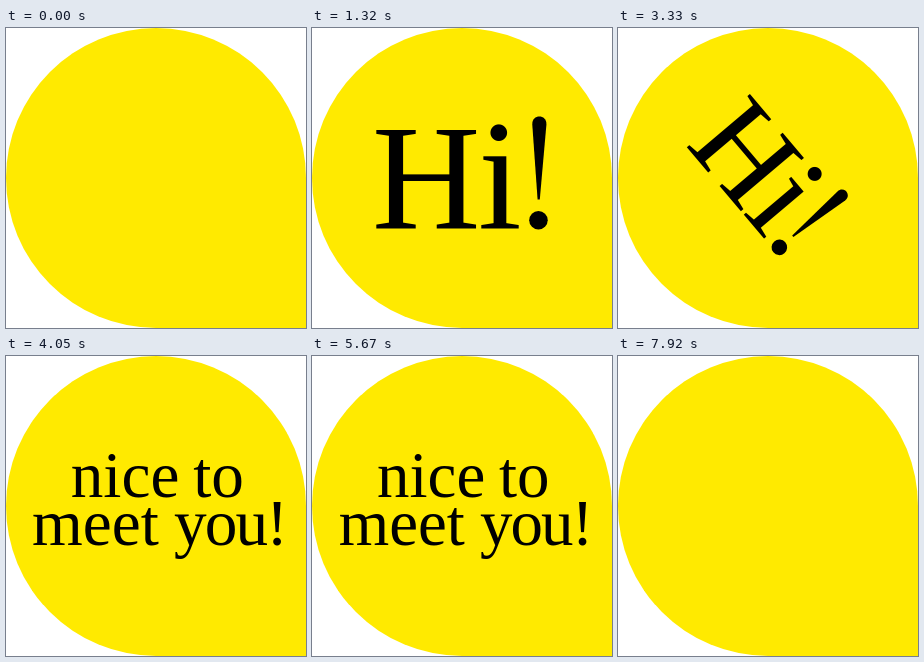
Recreate the animation shown at these times as an HTML page. Size 300 by 300 pixels, loop 8100 ms.

```html
<!DOCTYPE html>
<html lang="en">
<head>
<meta charset="utf-8">
<title>Greeting bubble</title>
<style>
  html, body { margin: 0; width: 100%; height: 100%; overflow: hidden; background: #fff; }
  svg { display: block; width: 100vw; height: 100vh; }
  text { font-family: "Liberation Serif", "Times New Roman", serif; }
  #meet { font-size: 65px; }
</style>
</head>
<body>
<svg viewBox="0 0 300 300">
  <path fill="#ffea00" d="M150 0A150 150 0 0 1 300 150V300H150A150 150 0 0 1 150 0Z"/>
  <g id="hi" visibility="hidden">
    <text y="61.7" font-size="170"><tspan x="-102.5">H</tspan><tspan x="17.5" font-size="178">i</tspan></text>
    <!-- teardrop exclamation mark -->
    <path d="M85 30 79-55C78.5-67 95.5-67 95-55L87.5 30Z"/>
    <circle cx="86" cy="53.5" r="10.5"/>
  </g>
  <g id="meet" visibility="hidden">
    <text y="-8"><tspan x="-85.5">nice </tspan><tspan x="36.5">to</tspan></text>
    <text y="40"><tspan x="-124">meet </tspan><tspan x="17.5" letter-spacing="-1.9">you!</tspan></text>
  </g>
</svg>
<script>
  const LOOP = 8100, STEP = 30;

  // Each phrase grows, rings around full size, then spins away to nothing.
  const phrases = [
    { id: 'hi', cx: 150.5, cy: 145, enter: 585, full: 1070, leave: 3250, gone: 3560, swing: 0.247, turn: 193 },
    { id: 'meet', cx: 150.5, cy: 149, enter: 3560, full: 4049, leave: 7590, gone: 7920, swing: 0.2, turn: 350 }
  ];
  for (const p of phrases) p.el = document.getElementById(p.id);

  const progress = (t, a, b) => Math.min(1, Math.max(0, (t - a) / (b - a)));

  function ring(ms, swing) {
    if (ms <= 0) return 1;
    const s = ms / 1000;
    return 1 + swing * Math.sin(s * 3 * 2 * Math.PI) * Math.exp(-3 * s);
  }

  function pose(p, t) {
    const out = progress(t, p.leave, p.gone);
    const scale = progress(t, p.enter, p.full) * ring(t - p.full, p.swing) * (1 - out);
    p.el.setAttribute('visibility', scale > 0 ? 'visible' : 'hidden');
    p.el.setAttribute('transform',
      `translate(${p.cx} ${p.cy}) rotate(${p.turn * out}) scale(${scale})`);
  }

  const start = performance.now();

  function draw() {
    const t = Math.floor(((performance.now() - start) % LOOP) / STEP) * STEP;
    for (const p of phrases) pose(p, t);
    requestAnimationFrame(draw);
  }
  draw();
</script>
</body>
</html>
```
